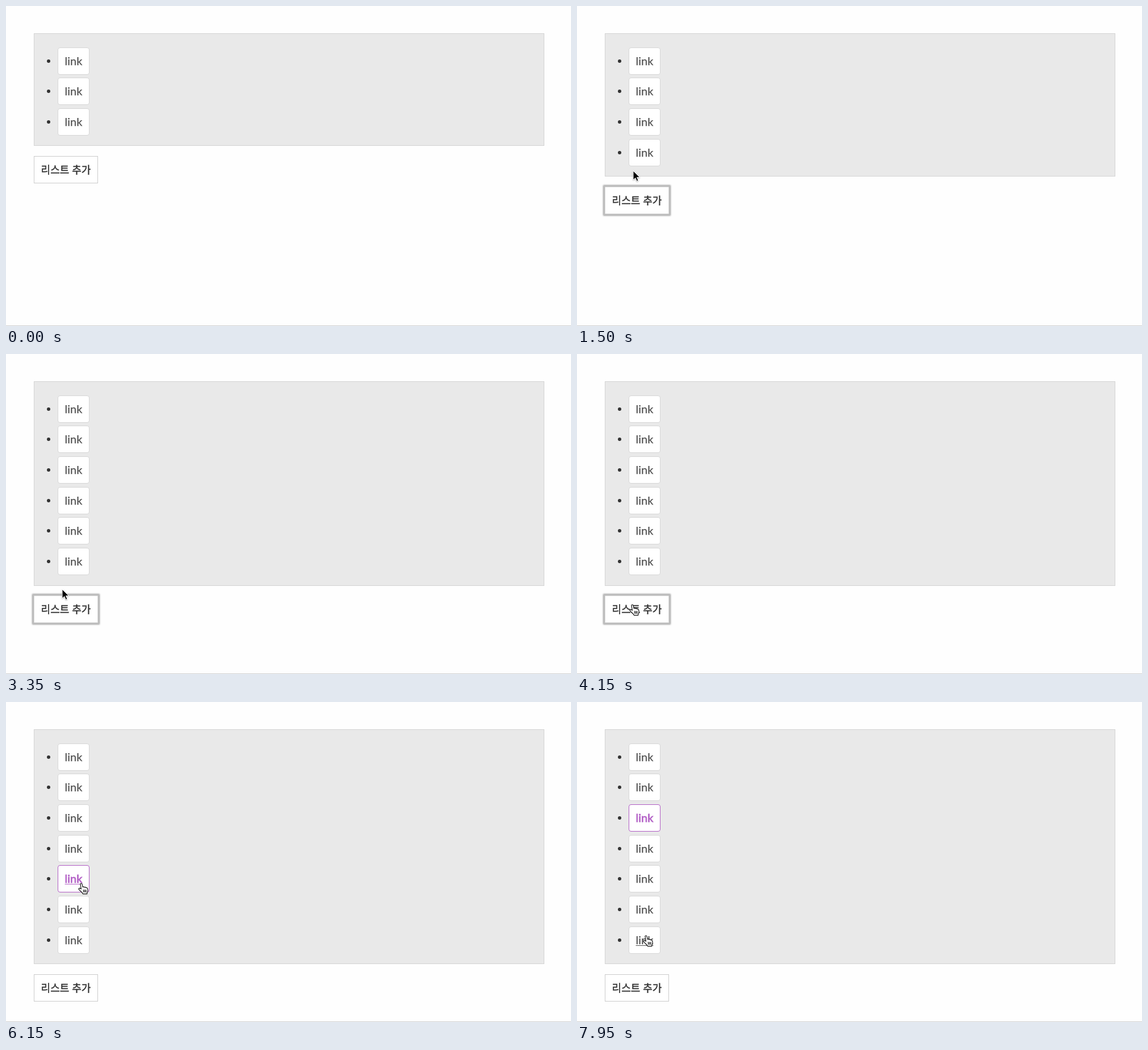
Write an HTML page that moves like this. It is 995 by 563 pixels and loops after 8 s.

```html
<!DOCTYPE html>
<html lang="ko">
<head>
<meta charset="utf-8">
<title>List</title>
<style>
  html, body { margin: 0; width: 100%; height: 100%; overflow: hidden; background: #fefefe; }
  #stage { position: relative; width: 995px; height: 563px; overflow: hidden; }
  #stage * { position: absolute; box-sizing: border-box; }
  #panel { left: 49px; top: 48px; width: 899px; background: #e9e9e9; border: 1px solid #d3d3d3; }
  .bullet { left: 72px; width: 6px; height: 6px; border-radius: 50%; background: #333; }
  .link {
    left: 91px; width: 56px; height: 48px; border: 1px solid #d6d6d6; border-radius: 4px;
    background: #fff; color: #505050; text-align: center; -webkit-text-stroke: .25px;
    font: 20px/45px Lato, sans-serif; text-underline-offset: 2px;
  }
  .link.over { text-decoration: underline 1px; }
  .link.active { border-color: #b05cc4; color: #b565c8; -webkit-text-stroke: .8px; }
  #button {
    left: 49px; width: 113px; height: 48px; border: 1px solid #cbcbcb; background: #fff; color: #333;
    text-align: center; white-space: nowrap; -webkit-text-stroke: .45px;
    font: 18px/44px "Noto Sans CJK KR", "Noto Sans CJK", sans-serif;
  }
  #button.focus { box-shadow: 0 0 0 3px #bdbdbd, 0 0 2px 4px #d4d4d4; border-color: #ddd; border-radius: 1px; }
  #line { left: 0; top: 562px; width: 995px; height: 1px; background: #cfcfcf; }
  #cursor { left: 0; top: 0; width: 24px; height: 26px; overflow: visible; }
</style>
</head>
<body>
<div id="stage">
  <div id="panel"></div>
  <div id="button">리스트 추가</div>
  <div id="line"></div>
  <svg id="cursor">
    <g id="arrow" style="filter: drop-shadow(0 1px 1px #0005)">
      <path d="M0 0V16L3.8 12.5L6.4 18.3L9 17.1L6.5 11.5H11.6Z" fill="#000" stroke="#fff"/>
    </g>
    <g id="hand" transform="translate(-6 -1)" stroke="#111" stroke-width="1.2" stroke-linejoin="round" stroke-linecap="round">
      <path fill="#fff" d="M5.4 11L4 3.2Q3.8 1 5.4 1Q6.8 1 7.2 3L8.2 7.6Q9.8 6.4 11 8Q12.6 7 13.7 8.7Q15.8 8 16.6 10.2L17.2 13.6Q17 16 15.8 17.4L15.7 19.6H8.3L7.6 18Q4.4 14.8 1.2 11.6Q.9 9 3.4 9.7Z"/>
      <path fill="none" d="M9.4 12.5l.3 4M11.6 12.5l.2 4M13.8 12.5l.1 4"/>
    </g>
  </svg>
</div>
<script>
const $ = id => document.getElementById(id);
const LOOP = 8000, STEP = 50, PITCH = 53.7, FIRST = 73, START_ROWS = 3, MAX_ROWS = 7;

// The button adds a row on each press; a press on a link selects it.
const buttonPresses = [1300, 2500, 3200, 4250];
const linkPresses = [4900, 6050, 6950, 7700];

// Each move: arrival time, duration, destination of the pointer
const moves = [
  [250, 100, 286, 405],
  [1050, 600, 99, 290],
  [1900, 250, 102, 361],
  [3050, 550, 99, 411],
  [4000, 800, 98, 441],
  [4700, 300, 118, 438],
  [5950, 1000, 133, 319],
  [6850, 650, 122, 380],
  [7600, 600, 100, 200],
  [7950, 150, 122, 411]
];

function pointerAt(t) {
  let x = 286, y = 512;
  for (const [end, duration, toX, toY] of moves) {
    const p = Math.min(1, Math.max(0, (t - end + duration) / duration));
    const e = p * p * (3 - 2 * p);
    x += (toX - x) * e;
    y += (toY - y) * e;
  }
  return { x, y };
}

function selectedRow(t) {
  const press = linkPresses.filter(p => p <= t).pop();
  return press ? Math.floor((pointerAt(press).y - FIRST) / PITCH) : -1;
}

function addElement(name, top, text = "") {
  const el = document.createElement("div");
  el.className = name;
  el.style.top = top + "px";
  el.textContent = text;
  $("stage").insertBefore(el, $("button"));
  return el;
}

const rows = Array.from({ length: MAX_ROWS }, (_, i) => {
  const top = FIRST + PITCH * i;
  return { top, link: addElement("link", Math.floor(top), "link"), bullet: addElement("bullet", top + 20.5) };
});

function draw(t) {
  const added = buttonPresses.filter(p => p <= t).length;
  const grown = PITCH * added;
  const buttonTop = 264 + grown;
  const { x, y } = pointerAt(t);
  const inside = (left, top, w, h) => x >= left && x <= left + w && y >= top && y <= top + h;
  const selected = selectedRow(t);
  let overTarget = inside(49, buttonTop, 113, 48);

  rows.forEach(({ top, link, bullet }, i) => {
    const shown = i < START_ROWS + added;
    link.style.display = bullet.style.display = shown ? "" : "none";
    link.classList.toggle("over", shown && inside(96, top + 5, 46, 37));
    link.classList.toggle("active", i === selected);
    overTarget ||= shown && inside(91, top, 56, 48);
  });

  $("panel").style.height = 198.4 + grown + "px";
  $("button").style.top = buttonTop + "px";
  $("button").classList.toggle("focus", t >= buttonPresses[0] - 100 && t < linkPresses[0]);
  $("cursor").style.display = t < 150 ? "none" : "";
  $("cursor").style.transform = `translate(${Math.round(x)}px, ${Math.round(y)}px)`;
  $("arrow").style.display = overTarget ? "none" : "";
  $("hand").style.display = overTarget ? "" : "none";
}

const start = performance.now();
function tick() {
  const t = (performance.now() - start) % LOOP;
  draw(Math.floor(t / STEP) * STEP);
  requestAnimationFrame(tick);
}
tick();
</script>
</body>
</html>
```
